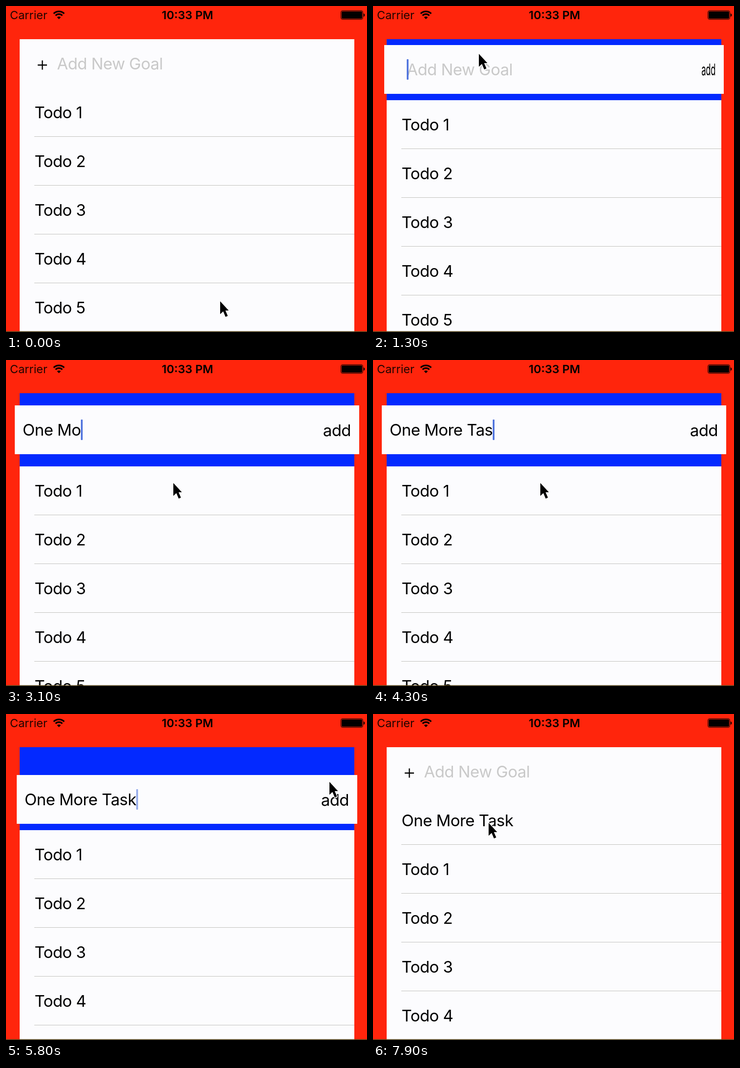
An HTML page that plays this animation: 740x668 px, repeating every 8000 ms.

```html
<!DOCTYPE html>
<html lang="en">
<head>
<meta charset="utf-8">
<title>Todo list</title>
<style>
  html, body { margin: 0; width: 100%; height: 100%; overflow: hidden; background: #ff250c; }
  svg { display: block; width: 740px; height: 668px; }
  text { font-family: Inter, Roboto, sans-serif; white-space: pre; }
  .body { font-size: 33px; letter-spacing: -0.55px; }
  .hint { fill: #c9c9c9; }
  .panel { fill: #fcfcfe; }
</style>
</head>
<body>
<svg viewBox="0 0 740 668">
  <rect width="740" height="668" fill="#ff250c"/>

  <text x="8" y="27" font-size="23.5" fill="#200400">Carrier</text>
  <g fill="none" stroke="#000" stroke-width="3.2">
    <path d="M97.7 15.7A15 15 0 0 1 119.3 15.7M101.6 19.6A9.6 9.6 0 0 1 115.4 19.6"/>
    <path d="M108.5 27L104.6 23.1A5.5 5.5 0 0 1 112.4 23.1Z" fill="#000" stroke="none"/>
  </g>
  <text x="372" y="27" font-size="23.5" font-weight="600" text-anchor="middle">10:33 PM</text>
  <rect x="686.5" y="9.5" width="45" height="18" rx="3.5" fill="none" stroke="#000"/>
  <rect x="688" y="11" width="42" height="15" rx="2"/>
  <path d="M733 15q2.5 1 2.5 3.5t-2.5 3.5z"/>

  <rect x="28" y="68" width="686" height="600" fill="#0329ff"/>

  <g id="field">
    <rect id="box" class="panel" height="100"/>
    <path id="plus" d="M-9.5 0H9.5M0 -9.5V9.5" stroke="#000" stroke-width="2.3"/>
    <text id="entry" class="body" y="61.5"></text>
    <rect id="caret" y="29" width="3.5" height="42" rx="1" fill="#4a6fdc"/>
    <text id="add" class="body" y="62.5" text-anchor="end">add</text>
  </g>

  <g id="list"></g>

  <rect y="666.4" width="740" height="1.6" fill="#54441c"/>
  <path id="pointer" d="M0 0V26.5L6.2 20.8L11 32L15.6 30L10.8 19H17.5Z" fill="#000"
        stroke="#fff" stroke-width="3" paint-order="stroke" stroke-linejoin="round"/>
</svg>
<script>
const LOOP = 8000, STEP = 100, ROW = 100;
const TASK = 'One More Task', HINT = 'Add New Goal';
const OPEN = 1100, TYPE = 1900, KEY_MS = 200, DROP = 5600, DONE = 6000, RISEN = 6360;

const $ = id => document.getElementById(id);
const [field, box, plus, entry, caret, add, list, pointer] =
  ['field', 'box', 'plus', 'entry', 'caret', 'add', 'list', 'pointer'].map($);

const clamp = v => Math.min(1, Math.max(0, v));
const lerp = (a, b, k) => a + (b - a) * k;
const ramp = (t, a, b) => clamp((t - a) / (b - a));
const ease = k => k * k * (3 - 2 * k);
const set = (el, attrs) => {
  for (const name in attrs) el.setAttribute(name, attrs[name]);
};

// time, x, y of the pointer tip
const pointerPath = [
  [100, 439, 605], [900, 217, 98], [1700, 217, 98], [2600, 343, 252],
  [4300, 343, 252], [5100, 663, 139], [6700, 663, 139], [7700, 237, 223]
];

function addRow(label, index) {
  const top = index * ROW;
  list.insertAdjacentHTML('beforeend', `<g>
    <rect class="panel" x="28" y="${top}" width="686" height="${ROW}"/>
    <text class="body" x="58.5" y="${top + 62}">${label}</text>
    <path d="M58 ${top + 99.5}H714" stroke="#c3c3bf"/></g>`);
  return list.lastElementChild;
}
const newRow = addRow(TASK, -1);
for (let i = 0; i < 6; i++) addRow('Todo ' + (i + 1), i);

function pointerAt(t) {
  let from = pointerPath[0];
  for (const to of pointerPath) {
    if (t <= to[0]) {
      const k = to === from ? 0 : ease(ramp(t, from[0], to[0]));
      return [lerp(from[1], to[1], k), lerp(from[2], to[2], k)];
    }
    from = to;
  }
  return from.slice(1);
}

function caretAlpha(t) {
  if (t >= TYPE && t < TYPE + KEY_MS * TASK.length) return 1;
  const phase = t % 1000;
  return 1 - ramp(phase, 400, 550) + ramp(phase, 680, 880);
}

function draw(t) {
  const done = t >= DONE;
  const open = done ? 0 : ease(ramp(t, OPEN, OPEN + 400));
  const drop = done ? 1 : 0.84 * ramp(t, DROP, DONE);
  const rise = 1 - (1 - ramp(t, DONE, RISEN)) ** 2;

  const inset = Math.floor(lerp(28, 18, open * (1 - drop)));
  const top = Math.floor(done ? lerp(168, 68, rise) : lerp(68, 93, open) + 77 * drop);
  const right = 742 - inset;
  set(field, { transform: `translate(0 ${top})` });
  set(box, { x: inset, width: right - inset });

  const typed = done ? '' : TASK.slice(0, Math.max(0, Math.floor((t - TYPE) / KEY_MS)));
  const textX = inset + lerp(76.5, 16, open);
  entry.textContent = typed || HINT;
  set(entry, { x: textX, class: typed ? 'body' : 'body hint' });

  const width = typed ? entry.getComputedTextLength() : 0;
  set(caret, { x: textX + width, opacity: open > 0 ? caretAlpha(t) : 0 });
  set(plus, { transform: `translate(${inset + 46.5} 53) scale(${clamp(1 - 2 * open)})` });
  set(add, { transform: `translate(${right - 17} 0) scale(${open} 1)` });

  const listTop = Math.floor(done ? 268 : 168 + 50 * open + 48 * drop);
  set(list, { transform: `translate(0 ${listTop})` });
  set(newRow, { visibility: done ? 'visible' : 'hidden' });
  set(pointer, { transform: `translate(${pointerAt(t)})` });
}

const start = performance.now();
function tick(now) {
  const t = Math.max(0, now - start) % LOOP;
  draw(Math.floor(t / STEP) * STEP);
  requestAnimationFrame(tick);
}
draw(0);
requestAnimationFrame(tick);
</script>
</body>
</html>
```
